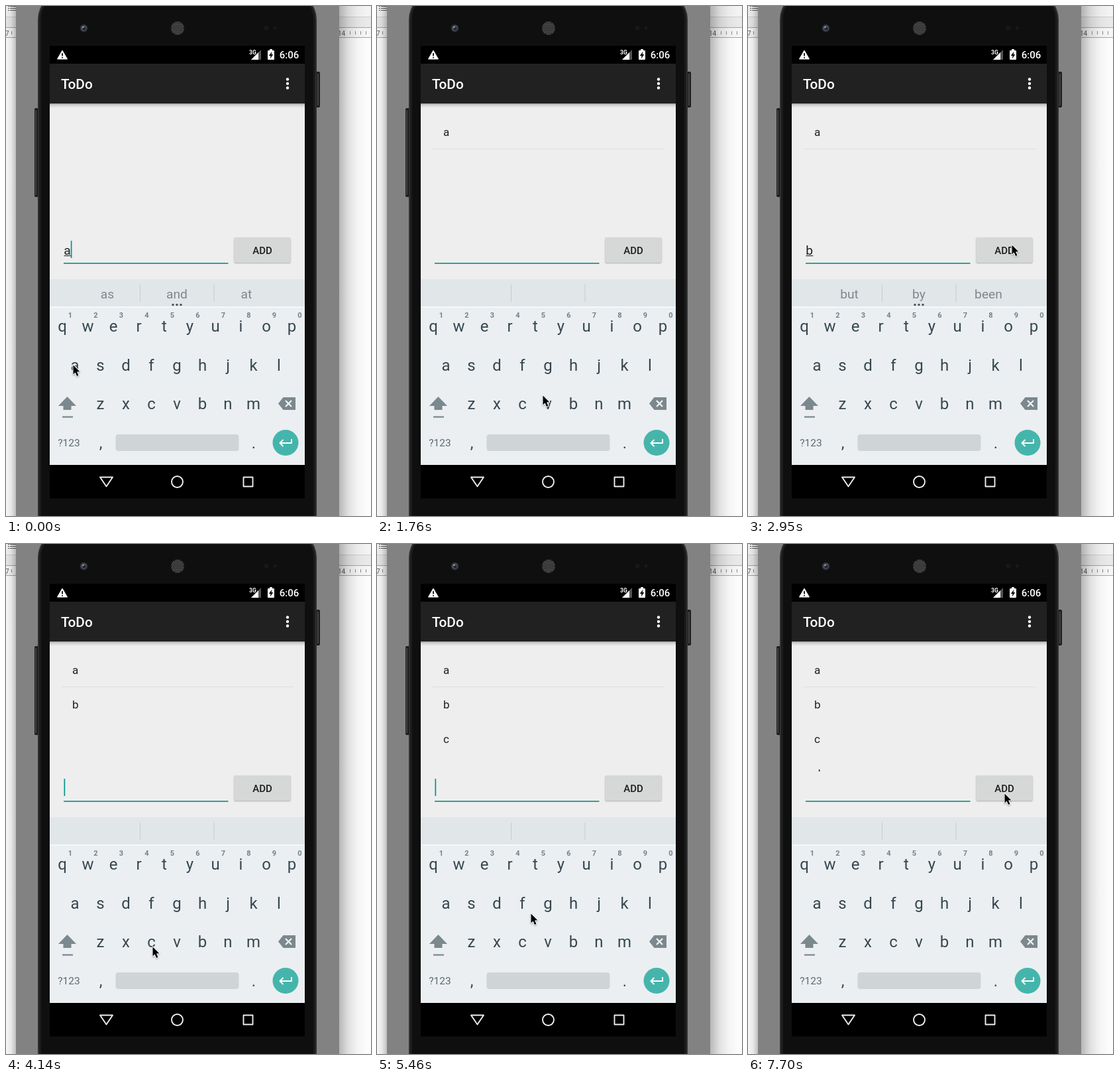
These frames come from a looping animation (551x769 px, 8 s). An HTML page with a canvas:

```html
<!DOCTYPE html>
<html lang="en">
<head>
<meta charset="utf-8">
<title>ToDo</title>
<style>
html, body { margin: 0; width: 100%; height: 100%; overflow: hidden; background: #828282; }
canvas { display: block; width: 551px; height: 769px; }
</style>
</head>
<body>
<canvas id="stage" width="551" height="769"></canvas>
<script>
const c = document.getElementById('stage').getContext('2d');
const LOOP = 8000, TICK = 148;
const TEAL = '#009688', KEY = '#37474f', GREY = '#7b888d';

// Ticks at which the key is down, the letter appears, hints show and ADD is pressed.
const entries = [
  { ch: 'a', x: 104, base: 550, down: -2, typed: 0, hint: 0, add: 6, words: ['as', 'and', 'at'] },
  { ch: 'b', x: 296.5, base: 608, down: 14, typed: 16, hint: 17, add: 21, words: ['but', 'by', 'been'] },
  { ch: 'c', x: 219.5, base: 608, down: 29, typed: 31, hint: 31, add: 34, words: ['can', 'could', 'come'] },
  { ch: 'd', x: 181, base: 550, down: 43, typed: 45, hint: 45, add: 48, words: ['do', 'did', 'don\u2019t'] }
];

// Pointer stops: tick, x, y.
const stops = [
  [0, 101, 541], [1, 118, 530], [4, 392, 371], [6, 394, 371], [8, 309, 505],
  [12, 250, 587], [14, 294, 600], [16, 295, 599], [19, 396, 365], [20, 398, 360],
  [22, 396, 364], [25, 268, 566], [28, 221, 607], [30, 222, 606], [32, 397, 368],
  [34, 394, 370], [37, 232, 557], [38, 216, 571], [40, 196, 562], [43, 175, 541],
  [44, 176, 541], [47, 387, 376]
];

function rect(x, y, w, h, color) {
  c.fillStyle = color;
  c.fillRect(x, y, w, h);
}

function round(x, y, w, h, r, color) {
  c.fillStyle = color;
  c.beginPath();
  c.roundRect(x, y, w, h, r);
  c.fill();
}

function disc(x, y, r, color) {
  c.fillStyle = color;
  c.beginPath();
  c.arc(x, y, r, 0, Math.PI * 2);
  c.fill();
}

function path(points, closed = true) {
  c.beginPath();
  points.forEach(([x, y], i) => i ? c.lineTo(x, y) : c.moveTo(x, y));
  if (closed) c.closePath();
}

function poly(points, color) {
  path(points);
  c.fillStyle = color;
  c.fill();
}

function line(points, color, width, closed = false) {
  path(points, closed);
  c.strokeStyle = color;
  c.lineWidth = width;
  c.stroke();
}

function text(str, x, y, size, color, weight = 400, align = 'center') {
  c.font = `${weight} ${size}px Roboto, sans-serif`;
  c.textAlign = align;
  c.fillStyle = color;
  c.fillText(str, x, y);
}

function fade(x0, y0, x1, y1, colors) {
  const g = c.createLinearGradient(x0, y0, x1, y1);
  colors.forEach((k, i) => g.addColorStop(i / (colors.length - 1), k));
  return g;
}

function backdrop() {
  rect(0, 0, 551, 769, '#fcfcfc');
  rect(0, 0, 551, 16, '#f3f3f3');
  rect(0, 16, 551, 1, '#cfcfcf');
  rect(0, 17, 551, 15, '#e9e9e9');
  rect(0, 32, 551, 1, '#a5a5a5');
  rect(0, 33, 551, 14, '#f6f6f6');
  rect(0, 47, 551, 1, '#a5a5a5');
  for (const y of [0, 3, 6]) {
    rect(3, y, 2, 1, '#555');
    rect(6, y, 9, 1, '#555');
  }
  text('7', -1, 45, 10, '#555', 400, 'left');
  text('14', 501, 45, 10, '#555', 400, 'left');
  for (let x = 519; x < 551; x += 8) rect(x, 38, 1, 5, '#888');
  rect(8, 38, 1, 5, '#888');
  rect(0, 0, 15, 769, fade(0, 0, 15, 0, ['rgba(0,0,0,.02)', 'rgba(0,0,0,.08)', 'rgba(0,0,0,.24)']));
  rect(503, 0, 42, 769, fade(503, 0, 545, 0, ['rgba(0,0,0,.27)', 'rgba(0,0,0,.11)', 'rgba(0,0,0,.03)', 'rgba(0,0,0,0)']));
  rect(15, 0, 488, 769, '#828282');
}

function phone() {
  round(43, 154, 9, 134, 2, '#1d1d1d');
  rect(44, 157, 2, 128, '#424242');
  round(465, 99, 9, 54, 2, '#1d1d1d');
  rect(470, 102, 2, 48, '#424242');
  round(48, -20, 421, 830, 40, '#303030');
  round(50, -18, 417, 826, 38, '#1b1b1b');
  round(53, -16, 411, 822, 35, '#0f0f0f');

  disc(117.5, 33.5, 6, '#292a2d');
  disc(117.5, 33.5, 4.3, '#505564');
  disc(118, 34, 2.6, '#20243a');
  disc(116.5, 32, 1.2, '#9ca4b8');
  disc(393, 33, 3.5, '#1b1718');
  disc(406, 33, 2.5, '#1b1718');

  disc(259, 33.5, 10.5, '#252525');
  for (let j = -4; j <= 4; j++) {
    for (let i = -5; i <= 5; i++) {
      const x = i * 2.4 + (j & 1 ? 1.2 : 0), y = j * 2.2;
      if (Math.hypot(x, y) < 9.5) disc(259 + x, 33.5 + y, 0.75, '#747474');
    }
  }
}

function statusBar() {
  rect(66, 60, 385, 682.5, '#000');
  c.lineJoin = 'round';
  const tri = [[85, 67], [92.5, 80], [77.5, 80]];
  poly(tri, '#fff');
  line(tri, '#fff', 1, true);
  rect(84.2, 71, 1.7, 4.5, '#000');
  rect(84.2, 77, 1.7, 1.7, '#000');
  text('3G', 367, 73, 8.5, '#fff', 700, 'left');
  poly([[385, 66], [385, 81], [370, 81]], '#555');
  poly([[381, 70], [381, 81], [370, 81]], '#fff');
  round(395, 67, 10, 14, 1, '#fff');
  rect(398, 65, 4, 3, '#fff');
  poly([[401.5, 68.5], [396.8, 75], [399.5, 75], [398.8, 79.5], [403.3, 73], [400.7, 73]], '#000');
  text('6:06', 427.5, 79, 15, '#fff', 500);
}

function app(n, entry) {
  rect(66, 87, 385, 60, '#212121');
  text('ToDo', 83, 125, 20.8, '#fff', 500, 'left');
  for (const y of [110.5, 117, 123.5]) disc(425, y, 2.2, '#fff');

  rect(66, 147, 385, 265, '#eee');
  rect(66, 147, 385, 7, fade(0, 147, 0, 154, ['#aaa', '#d9d9d9', '#eee']));

  c.save();
  c.beginPath();
  c.rect(66, 147, 385, 196);
  c.clip();
  const listed = entries.filter(e => n >= e.add);
  listed.forEach((e, i) => text(e.ch, 100, 196 + 52 * i, 17.1, '#212121', 400, 'left'));
  if (listed.length) rect(84, 215, 350, 1, '#dedede');
  c.restore();

  rect(87, 387, 248.5, 2, '#35a096');
  let caret = 87.5;
  if (entry) {
    text(entry.ch, 87.3, 375, 19.25, '#212121', 400, 'left');
    const w = c.measureText(entry.ch).width;
    rect(87.5, 376, w, 1.2, '#333');
    caret += w - 0.2;
  }
  const last = Math.max(...entries.flatMap(e => [e.typed, e.add]).filter(k => k <= n));
  if (Math.floor((n - last) * TICK / 500) % 2 === 0) rect(caret, 354, 1.7, 26, TEAL);

  const pressed = entries.some(e => e.add === n);
  c.save();
  c.shadowColor = pressed ? 'rgba(0,0,0,.4)' : 'rgba(0,0,0,.28)';
  c.shadowBlur = pressed ? 4 : 2;
  c.shadowOffsetY = 1;
  round(344.5, 349, 85, 38, 2, pressed ? '#c9caca' : '#d6d7d7');
  c.restore();
  text('ADD', 387, 374, 15, '#1c1c1c', 500);
}

function keyboard(n, entry) {
  rect(66, 412, 385, 41, '#e1e6e9');
  rect(66, 453, 385, 239, '#ebeff2');
  rect(66, 453, 385, 2, '#f6f8f9');
  rect(202, 420, 1, 26, '#c6cccf');
  rect(313.5, 420, 1, 26, '#c6cccf');
  if (entry && n >= entry.hint) {
    entry.words.forEach((w, i) => text(w, 153 + 105 * i, 441, 19.25, '#7e888d'));
    for (const x of [252, 258, 264]) disc(x, 450.5, 1.7, '#485459');
  }

  const row = (keys, x, base) =>
    [...keys].forEach((k, i) => text(k, x + 38.5 * i, base, 24, KEY));
  row('qwertyuiop', 85, 491);
  row('asdfghjkl', 104, 550);
  row('zxcvbnm', 142.5, 608);
  [...'1234567890'].forEach((k, i) => text(k, 97 + 38.5 * i, 470, 11, '#74818a', 700));

  poly([[92.5, 589], [106, 603], [79, 603]], GREY);
  rect(86.5, 602, 12, 7, GREY);
  rect(85, 618.5, 16, 2.2, GREY);

  poly([[411, 599.5], [418.5, 590], [437, 590], [437, 609], [418.5, 609]], GREY);
  line([[422, 595], [431, 604]], '#f4f6f7', 2.2);
  line([[431, 595], [422, 604]], '#f4f6f7', 2.2);

  text('?123', 95, 664, 15.5, '#5d6a70');
  text(',', 143, 667, 24, KEY);
  text('.', 374, 667, 24, KEY);
  round(165.5, 646, 186, 25, 4, '#cfd4d7');

  disc(422, 658.5, 19.5, '#45b5ac');
  line([[431, 653], [431, 659], [414, 659]], '#fff', 2);
  line([[418.5, 654], [413.5, 659], [418.5, 664]], '#fff', 2);

  const held = entries.find(e => n >= e.down && n < e.down + 2 && n < e.typed);
  if (held) {
    c.save();
    c.shadowColor = 'rgba(0,0,0,.4)';
    c.shadowBlur = 3;
    c.shadowOffsetY = 1;
    round(held.x - 25.5, held.base - 106.5, 52, 122, 2, '#cfd5d8');
    c.restore();
    text(held.ch, held.x, held.base - 63, 34, KEY);
  }
}

function navBar() {
  line([[142, 710.5], [161, 710.5], [151.5, 724.5]], '#eee', 1.9, true);
  c.beginPath();
  c.arc(258.5, 717.5, 8.5, 0, Math.PI * 2);
  c.stroke();
  c.strokeRect(358.5, 710.5, 14, 14);
}

function pointer(n) {
  let i = stops.findIndex(s => s[0] > n);
  if (i < 0) i = stops.length;
  const a = stops[i - 1], b = stops[i] || a;
  const p = b === a ? 0 : (n - a[0]) / (b[0] - a[0]);
  const x = a[1] + (b[1] - a[1]) * p, y = a[2] + (b[2] - a[2]) * p;
  c.save();
  c.translate(Math.round(x), Math.round(y));
  const arrow = [[0.5, 0.5], [0.5, 14.5], [3.6, 11.6], [6, 17], [8.5, 16], [6.1, 10.6], [10.3, 10.3]];
  c.shadowColor = 'rgba(0,0,0,.35)';
  c.shadowBlur = 2;
  c.shadowOffsetY = 1;
  line(arrow, '#fff', 2, true);
  c.restore();
  c.save();
  c.translate(Math.round(x), Math.round(y));
  poly(arrow, '#000');
  c.restore();
}

function draw(now) {
  const n = Math.floor((now % LOOP + 20) / TICK);
  const entry = entries.find(e => n >= e.typed && n < e.add);
  backdrop();
  phone();
  statusBar();
  app(n, entry);
  keyboard(n, entry);
  navBar();
  pointer(n);
}

let start;
function loop(now) {
  start ??= now;
  draw(Math.max(0, now - start));
  requestAnimationFrame(loop);
}
draw(0);
requestAnimationFrame(loop);
</script>
</body>
</html>
```
